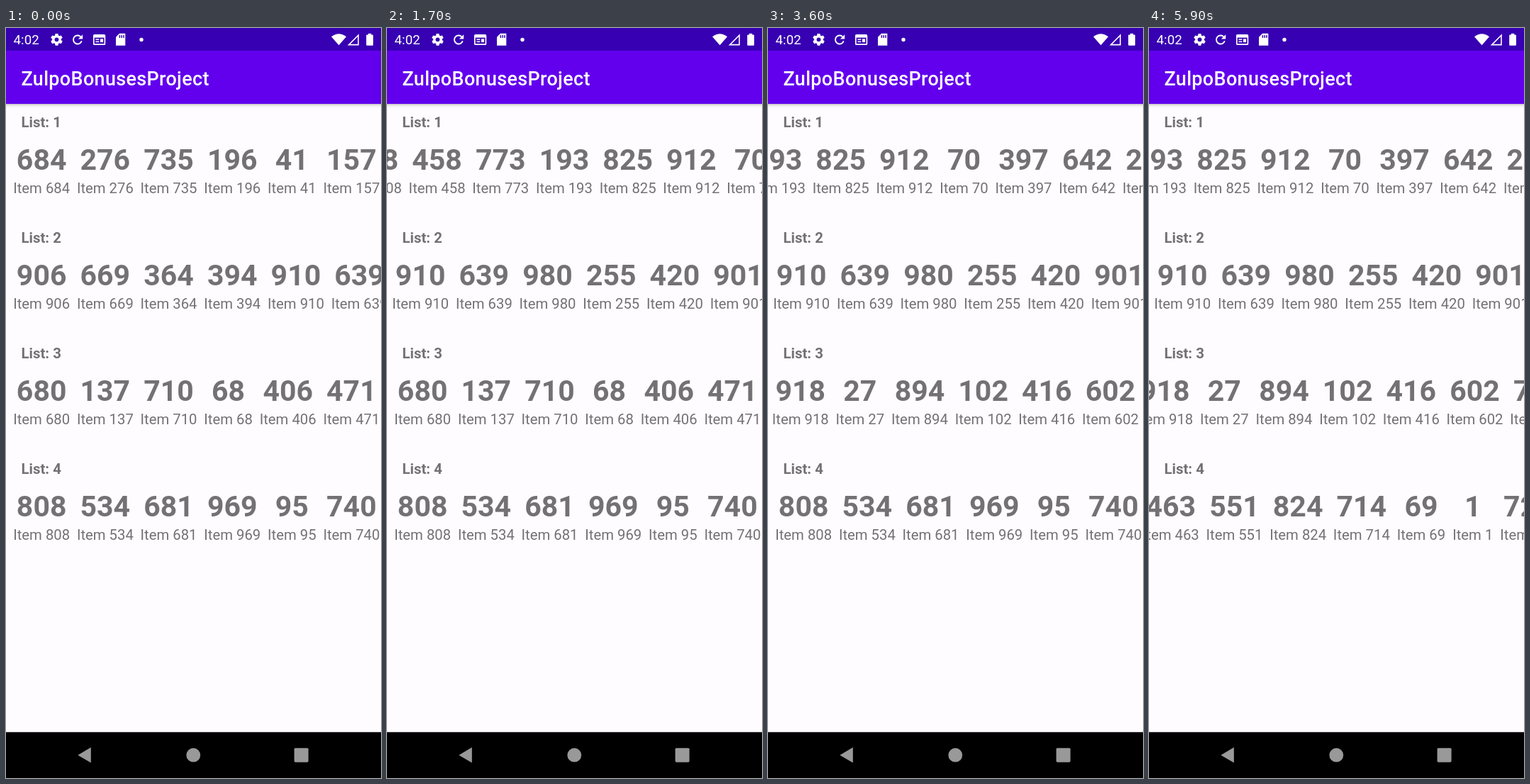
Write an HTML page with a canvas that moves like this. It is 529 px wide and 1058 px high and loops after 6000 ms.

```html
<!DOCTYPE html>
<html lang="en">
<head>
<meta charset="utf-8">
<title>Scrolling lists</title>
<style>
  html, body { margin: 0; width: 100%; height: 100%; overflow: hidden; background: #fefcff; }
  canvas { display: block; width: 529px; height: 1058px; }
</style>
</head>
<body>
<canvas id="stage"></canvas>
<script>
const W = 529, H = 1058, LOOP = 6000, STEP = 100;
const LEFT = 5.3, ROW = 163;
const FONT = 'Roboto, "Noto Sans", sans-serif';
const canvas = document.getElementById('stage');
const ctx = canvas.getContext('2d');
const dpr = window.devicePixelRatio || 1;
canvas.width = W * dpr;
canvas.height = H * dpr;

let seed = 7;
function randomId() {
  seed = (seed * 16807) % 2147483647;
  return String(100 + seed % 900);
}

const clamp = v => Math.max(0, Math.min(1, v));
const cellWidth = id => 56 + 11.23 * id.length;

// "+n" in the text stands for n cells that only rush past.
function makeRow(text, start, time, stopId, stopX) {
  const ids = text.split(' ').flatMap(word =>
    word[0] === '+' ? Array.from({ length: +word }, randomId) : [word]);
  const before = ids.slice(0, ids.indexOf(stopId));
  const dist = before.reduce((x, id) => x + cellWidth(id), LEFT) - stopX;
  return { ids, start, time, dist };
}

// Each row is flung once and stops with one given cell at a given x.
const rows = [
  makeRow('684 276 735 196 41 157 +9 193 825 912 70 397 642 253', 1150, 1200, '825', 57.8),
  makeRow('906 669 364 394 910 639 980 255 420 901', 150, 750, '910', 2.3),
  makeRow('680 137 710 68 406 471 +2 192 74 686 918 27 894 102 416 602 748', 2770, 1075, '894', 145.6),
  makeRow('808 534 681 969 95 740 450 663 962 +9 927 463 551 824 714 69 1 725', 4033, 1225, '551', 75.6)
];

// Decelerating fling: time and distance share one cubic parameter.
function fling(t) {
  if (t <= 0 || t >= 1) return clamp(t);
  let lo = 0, hi = 1;
  for (let i = 0; i < 30; i++) {
    const x = (lo + hi) / 2;
    if (0.525 * x + 0.475 * x ** 3 < t) lo = x; else hi = x;
  }
  return 1.5 * lo - 0.5 * lo ** 3;
}

function rect(x, y, w, h, color) {
  ctx.fillStyle = color;
  ctx.fillRect(x, y, w, h);
}

function roundRect(x, y, w, h, r, color) {
  ctx.fillStyle = color;
  ctx.beginPath();
  ctx.roundRect(x, y, w, h, r);
  ctx.fill();
}

function text(str, x, y, size, weight, color, align = 'left') {
  ctx.font = `${weight} ${size}px ${FONT}`;
  ctx.fillStyle = color;
  ctx.textAlign = align;
  ctx.fillText(str, x, y);
}

function path(points) {
  ctx.beginPath();
  points.forEach(([x, y]) => ctx.lineTo(x, y));
  ctx.closePath();
}

function poly(points, color) {
  path(points);
  ctx.fillStyle = color;
  ctx.fill();
}

function disc(x, y, r, color) {
  ctx.fillStyle = color;
  ctx.beginPath();
  ctx.arc(x, y, r, 0, Math.PI * 2);
  ctx.fill();
}

function gear(x, y, bar) {
  for (let i = 0; i < 6; i++) {
    ctx.save();
    ctx.translate(x, y);
    ctx.rotate(i * Math.PI / 3);
    poly([[-2.6, -5], [-1.9, -8.4], [1.9, -8.4], [2.6, -5]], '#fff');
    ctx.restore();
  }
  disc(x, y, 6.3, '#fff');
  disc(x, y, 2.9, bar);
}

function refresh(x, y) {
  ctx.lineWidth = 1.9;
  ctx.beginPath();
  ctx.arc(x, y, 6, 0.3, Math.PI * 1.75);
  ctx.stroke();
  poly([[x + 7.2, y - 7.2], [x + 7.2, y - 0.9], [x + 0.9, y - 0.9]], '#fff');
}

function news(x, y) {
  ctx.lineWidth = 1.7;
  ctx.beginPath();
  ctx.roundRect(x + 0.8, y + 0.8, 15.6, 13.4, 1);
  ctx.stroke();
  rect(x + 1, y + 1, 15, 3.6, '#fff');
  rect(x + 3.4, y + 6.4, 5, 1.5, '#fff');
  rect(x + 3.4, y + 9.6, 5, 1.5, '#fff');
  rect(x + 10, y + 6.4, 4, 4.7, '#fff');
}

function card(x, y, bar) {
  poly([[x + 5, y], [x + 13.3, y], [x + 13.3, y + 17], [x, y + 17], [x, y + 5]], '#fff');
  for (let i = 0; i < 3; i++) rect(x + 4.6 + i * 2.8, y + 2.3, 1.5, 3.8, bar);
}

function wifi(x, y) {
  ctx.fillStyle = '#fff';
  ctx.beginPath();
  ctx.moveTo(x, y);
  ctx.lineTo(x - 10.5, y - 12.1);
  ctx.quadraticCurveTo(x, y - 19.9, x + 10.5, y - 12.1);
  ctx.fill();
}

function statusBar() {
  const bar = '#3700b3';
  rect(0, 0, W, 32, bar);
  text('4:02', 10.6, 23.3, 18.7, 400, '#fff');
  ctx.strokeStyle = '#fff';
  gear(71.5, 16.3, bar);
  refresh(101, 16.5);
  news(123, 9);
  card(155, 7.8, bar);
  disc(191, 16.5, 2.7, '#fff');
  wifi(469.5, 24.3);

  ctx.lineWidth = 1.6;
  path([[483.6, 23.6], [497, 23.6], [497, 10.2]]);
  ctx.stroke();

  rect(511, 7.8, 4.2, 3, '#fff');
  roundRect(508.2, 9.5, 9.8, 15.2, 1.2, '#fff');
}

function appBar() {
  const shade = ctx.createLinearGradient(0, 107, 0, 113);
  shade.addColorStop(0, 'rgba(0,0,0,.24)');
  shade.addColorStop(0.4, 'rgba(0,0,0,.07)');
  shade.addColorStop(1, 'rgba(0,0,0,0)');
  rect(0, 107, W, 6, shade);
  rect(0, 32, W, 75, '#6200ee');
  ctx.letterSpacing = '0.34px';
  text('ZulpoBonusesProject', 21.5, 80.8, 26.94, 500, '#fff');
  ctx.letterSpacing = '0px';
}

function navBar() {
  const gray = '#999';
  rect(0, 993.3, W, H - 993.3, '#000');
  poly([[101.4, 1025.7], [119.8, 1014.8], [119.8, 1036.6]], gray);
  disc(264.3, 1025.7, 9.9, gray);
  roundRect(406.6, 1015.7, 20, 20, 1.6, gray);
}

function list(row, i, t) {
  const y = i * ROW, gray = '#737174';
  text(`List: ${i + 1}`, 21.5, y + 140.3, 20.4, 700, gray);
  let x = LEFT - row.dist * fling((t - row.start) / row.time);
  for (const id of row.ids) {
    const w = cellWidth(id), mid = x + w / 2;
    if (x < W && x + w > 0) {
      text(id, mid, y + 200.4, 41, 700, gray, 'center');
      text(`Item ${id}`, mid, y + 233.2, 20.3, 400, gray, 'center');
    }
    x += w;
  }
}

function draw(t) {
  ctx.setTransform(dpr, 0, 0, dpr, 0, 0);
  rect(0, 0, W, H, '#fefcff');
  rows.forEach((row, i) => list(row, i, t));
  statusBar();
  appBar();
  navBar();
}

const begin = performance.now();
function tick() {
  const t = (performance.now() - begin) % LOOP;
  draw(Math.floor(t / STEP) * STEP);
  requestAnimationFrame(tick);
}
tick();
</script>
</body>
</html>
```
